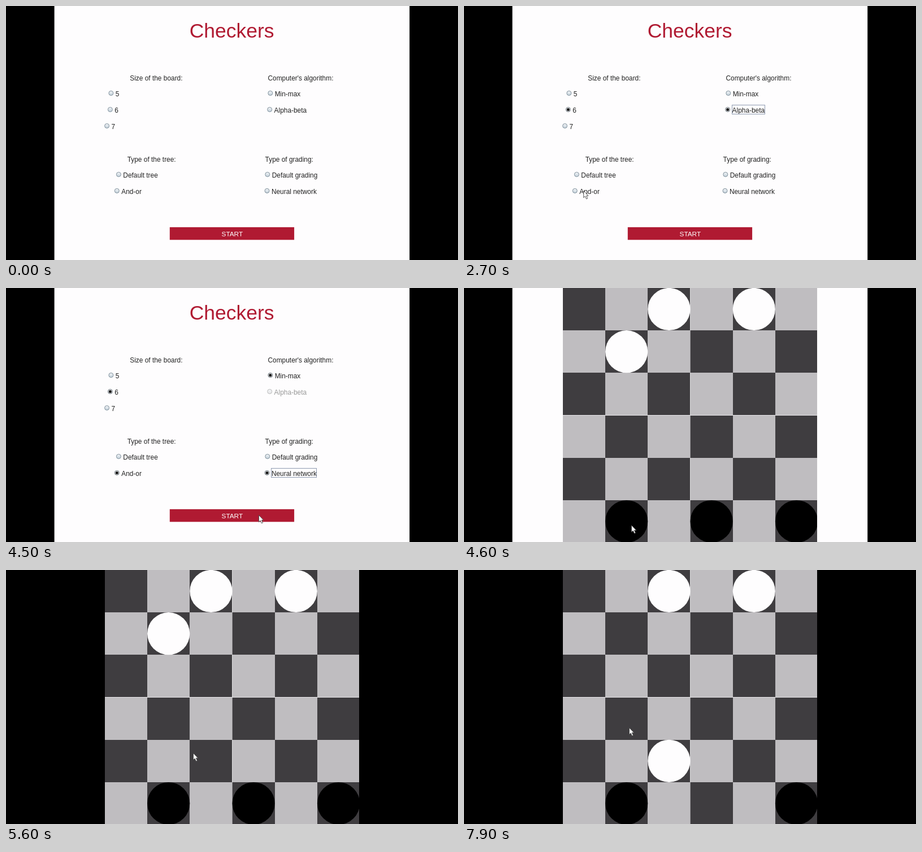
These frames come from a looping animation (800x450 px, 8 s). An HTML page with a canvas:

```html
<!DOCTYPE html>
<html lang="en">
<head>
<meta charset="utf-8">
<title>Checkers</title>
<style>
  html, body { margin: 0; overflow: hidden; background: #000; }
  canvas { display: block; }
</style>
</head>
<body>
<canvas id="stage" width="800" height="450"></canvas>
<script>
const ctx = document.getElementById('stage').getContext('2d');
const LOOP = 8000, STEP = 100, GAME_START = 4600, CELL = 75.2;
const PAPER = '#fefdfe', RED = '#b01a32', INK = '#222', DARK = '#3f3d40', LIGHT = '#bfbdc0';

const groups = [
  { title: 'Size of the board:', x: 219.3, y: 132, items: { 5: 193.8, 6: 192.3, 7: 186.5 } },
  { title: "Computer's algorithm:", x: 463.5, y: 132, items: { 'Min-max': 475.7, 'Alpha-beta': 474.6 } },
  { title: 'Type of the tree:', x: 214.7, y: 276, items: { 'Default tree': 207.3, 'And-or': 204.2 } },
  { title: 'Type of grading:', x: 458.6, y: 276, items: { 'Default grading': 470.7, 'Neural network': 469.9 } }
];
const options = groups.flatMap(group => Object.entries(group.items)
  .map(([label, x], i) => ({ label, x, y: group.y + 28 + 29 * i })));

// The pointer leaves its last stop, then arrives at a point or an option
const stop = (leave, arrive, x, y) => ({ leave, arrive, x, y });
const press = (leave, arrive, label) => {
  const option = options.find(o => o.label === label);
  return { ...stop(leave, arrive, option.x + 7, option.y - 6), label };
};
const route = [
  stop(200, 200, 420, 300),
  press(200, 700, '6'),
  press(1000, 1500, 'Alpha-beta'),
  press(2000, 2700, 'And-or'),
  press(3100, 3500, 'Neural network'),
  stop(3700, 4400, 447, 402),
  stop(GAME_START, GAME_START, 296, 420),
  stop(5000, 5300, 437, 414),
  stop(5300, 5600, 331, 324),
  stop(6400, 6800, 350, 334),
  stop(7100, 7300, 287, 270),
  stop(7800, 7900, 292, 279)
];

function rect(color, x, y, w, h) {
  ctx.fillStyle = color;
  ctx.fillRect(x, y, w, h);
}

function disc(color, x, y, r) {
  ctx.beginPath();
  ctx.arc(x, y, r, 0, 7);
  ctx.fillStyle = color;
  ctx.fill();
}

function text(label, x, y, size = 11.9, color = INK, align = 'left') {
  ctx.font = `${size}px "Liberation Sans", Arial, sans-serif`;
  ctx.textAlign = align;
  ctx.fillStyle = color;
  ctx.fillText(label, x, y);
}

function drawPointer(t) {
  const i = route.findLastIndex(s => s.leave <= t);
  if (i < 0) return;
  const to = route[i], from = route[i - 1] || to;
  const progress = Math.min(1, (t - to.leave) / (to.arrive - to.leave || 1));
  const k = to.arrive === to.leave ? 1 : 1 - (1 - progress) ** 2;

  ctx.save();
  ctx.translate(from.x + (to.x - from.x) * k, from.y + (to.y - from.y) * k);
  const arrow = new Path2D('M.5 .5V12.5L3.2 10L5.4 14.8L7.5 13.9L5.4 9.2H8.8Z');
  ctx.fillStyle = '#fff';
  ctx.strokeStyle = '#444';
  ctx.lineWidth = 0.9;
  ctx.fill(arrow);
  ctx.stroke(arrow);
  ctx.restore();
}

function drawRadio(x, y, checked, disabled) {
  const plain = checked || disabled;
  const shade = ctx.createLinearGradient(x, y - 4, x, y + 4);
  shade.addColorStop(0, '#f4f6f8');
  shade.addColorStop(1, plain ? '#e6e6e8' : '#c2d0da');
  disc(shade, x, y, 4);
  ctx.strokeStyle = disabled ? '#bbb' : checked ? '#667078' : '#7f8f9b';
  ctx.lineWidth = 1;
  ctx.stroke();
  if (checked) disc('#151515', x, y, 2.5);
}

function drawMenu(t) {
  const pressed = route.filter(s => s.label && t >= s.arrive + 100).map(s => s.label);
  const focus = pressed.at(-1);
  // The And-or tree only works with Min-max
  const locked = pressed.includes('And-or') && t >= 2900;
  const isChecked = label => label === 'Min-max' ? locked
    : pressed.includes(label) && !(locked && label === 'Alpha-beta');

  text('Checkers', 399.6, 56, 35.5, RED, 'center');
  groups.forEach(group => text(group.title, group.x, group.y));
  for (const { label, x, y } of options) {
    const disabled = locked && label === 'Alpha-beta';
    drawRadio(x - 7.9, y - 5.6, isChecked(label), disabled);
    text(label, x, y, 11.9, disabled ? '#999' : INK);
    if (label === focus) {
      ctx.strokeStyle = '#8e9ab0';
      ctx.strokeRect(Math.round(x) - 0.5, y - 13.5, Math.round(ctx.measureText(label).width), 16);
    }
  }
  rect(RED, 289.8, 391.9, 220.3, 22.4);
  text('START', 400.3, 408.4, 11.8, '#fff', 'center');
}

function drawBoard(t) {
  const edge = i => Math.round(i * (CELL - 0.05));
  const piece = (color, [col, row]) =>
    disc(color, 212.5 + CELL * col, 37.5 + CELL * row, CELL / 2);

  ctx.save();
  ctx.beginPath();
  ctx.rect(175, 0, 450, 450);
  ctx.clip();
  for (let row = 0; row < 6; row++)
    for (let col = 0; col < 6; col++)
      rect((row + col) % 2 ? LIGHT : DARK, 175 + edge(col), edge(row), 76, 76);
  rect('#e6e4e7', 175, 225, 450, 1);
  rect('#ffffff70', 400, 0, 1, 450);

  // Both sides move at once; the second turn captures the black piece
  const turn = (t >= 5900) + (t >= 7500);
  const white = [[1, 1], [0, 2], [2, 4]][turn];
  const black = [[3, 5], [2, 4]][turn];
  for (const col of [2, 4]) piece(PAPER, [col, 0]);
  for (const col of [1, 5]) piece('#000', [col, 5]);
  piece(PAPER, white);
  if (black) piece('#000', black);
  ctx.restore();
}

function draw(now) {
  const t = Math.floor((now % LOOP) / STEP) * STEP;
  rect('#000', 0, 0, 800, 450);
  if (t <= GAME_START) rect(PAPER, 85.6, 0, 628.6, 450);
  (t < GAME_START ? drawMenu : drawBoard)(t);
  drawPointer(t);
  requestAnimationFrame(draw);
}
requestAnimationFrame(draw);
</script>
</body>
</html>
```
